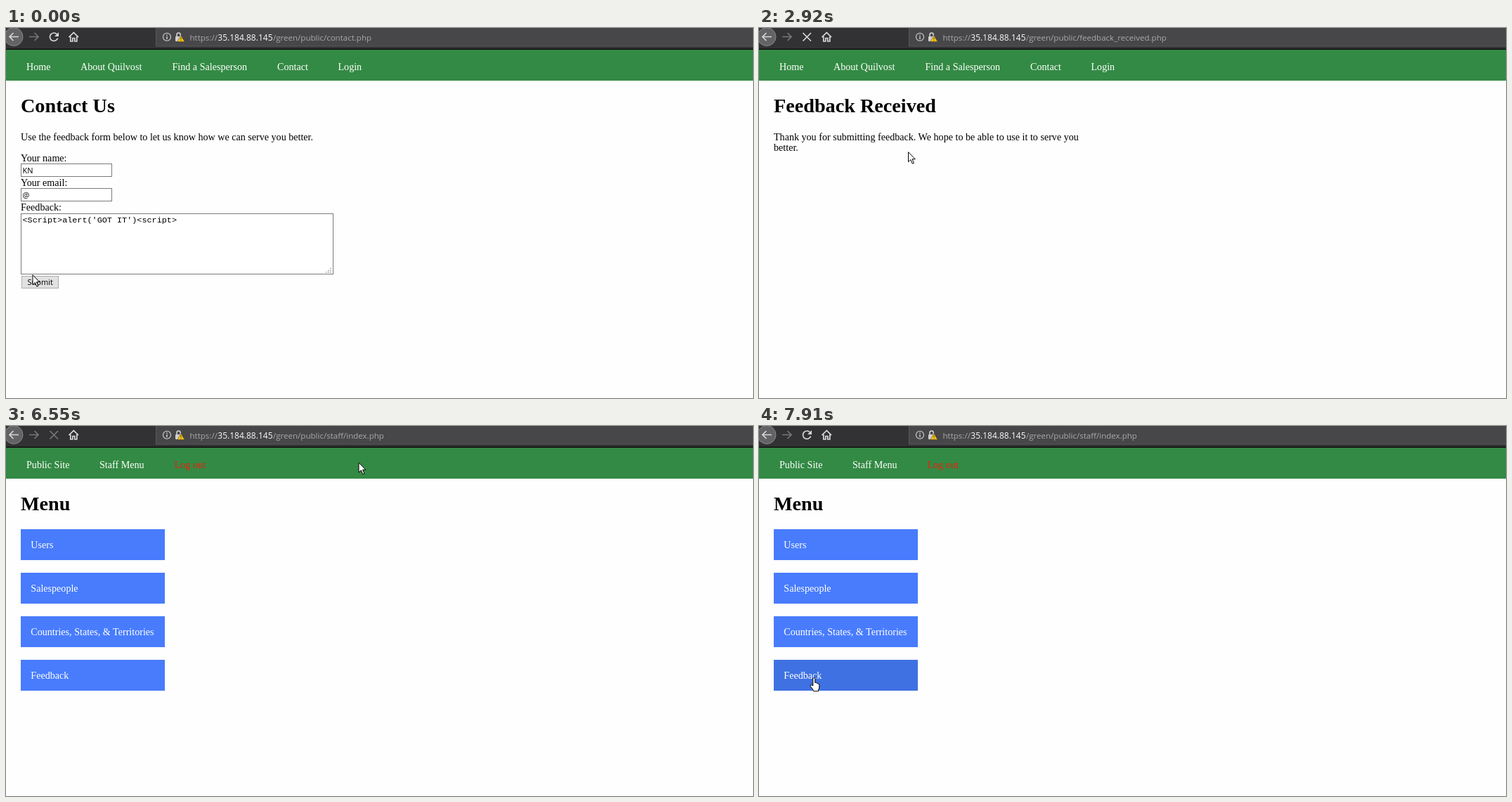
Animation of 1063 by 527 pixels, one loop 8000 ms. Source, as an HTML page:

```html
<!DOCTYPE html>
<html lang="en">
<head>
<meta charset="utf-8">
<title>Feedback form</title>
<style>
  html, body { margin: 0; height: 100%; overflow: hidden; background: #fefefe; }
  svg { display: block; }
  text { font: 14.1px "Liberation Serif", serif; white-space: pre; }
  .h1 { font-size: 28.2px; font-weight: bold; }
  .nav text, .item text { fill: #fff; }
  .nav .out { fill: #f01c10; }
  .item rect { fill: #487cfd; }
  .item.lit rect { fill: #3f71e2; }
  .field { fill: #fff; stroke: #7a7a7a; }
  .ui { font: 11px "Open Sans", sans-serif; }
  .code { font: 11.8px "Liberation Mono", monospace; }
  .url { font: 11.55px "Open Sans", sans-serif; fill: #a9a9ab; }
  .url.host { font-size: 12px; fill: #fbfbfb; }
  #submit rect { fill: #e1e1e1; stroke: #adadad; }
  #submit.lit rect { fill: #e5f1fb; stroke: #0078d7; }
  .icon { fill: none; stroke: #d6d6d8; stroke-width: 1.7; }
  .dim { stroke: #77777a; }
</style>
</head>
<body>
<svg width="1063" height="527" viewBox="0 0 1063 527">
  <rect width="1063" height="527" fill="#fefefe"/>

  <!-- browser toolbar -->
  <rect width="1063" height="31" fill="#323234"/>
  <rect y="29.5" width="1063" height="1.5" fill="#111"/>
  <rect x="213.5" y="-5" width="860" height="31" fill="#474749" stroke="#58585a"/>
  <circle cx="11" cy="12.5" r="13" fill="#636365" stroke="#88888a"/>
  <path class="icon" d="M18 12.5H5M10.5 7L5 12.5L10.5 18"/>
  <path class="icon dim" d="M33 12.5H46M40.5 7L46 12.5L40.5 18"/>
  <g id="reload">
    <path class="icon" d="M72.5 9A5.7 5.7 0 1 0 73.6 14.5"/>
    <path d="M75 6V12H69Z" fill="#d6d6d8"/>
  </g>
  <path id="spin" class="icon dim" d="M64 17A5.7 5.7 0 1 1 72 17"/>
  <path id="stop" class="icon" d="M62.5 7L74 18.5M74 7L62.5 18.5"/>
  <path class="icon" d="M89.5 13.2L96.3 6.5L103 13.2M91.8 12V19H94.8V14.5H97.8V19H100.8V12"/>
  <circle class="icon" cx="229" cy="12.8" r="5.5" style="stroke-width:1.1"/>
  <path class="icon" d="M229 9.3V10.8M229 12V16" style="stroke-width:1.4"/>
  <path class="icon" d="M243 12V9.5A2.6 2.6 0 0 1 248.2 9.5V12" style="stroke-width:1.5"/>
  <rect x="241" y="12" width="9" height="7" rx="1" fill="#cfcfd1"/>
  <path d="M249 10.5L254 19.5H244Z" fill="#ffc40c" stroke="#474749" stroke-width=".6"/>
  <path d="M249 13.3V16.2M249 17.2V18.4" stroke="#5a4500"/>
  <text class="url" x="261.5" y="17.5">https://</text>
  <text class="url host" x="301.3" y="17.5">35.184.88.145</text>
  <text class="url" id="path" x="380" y="17.5"></text>

  <!-- site navigation -->
  <rect y="31" width="1063" height="44" fill="#338a44"/>
  <g class="nav" id="publicNav">
    <text x="29" y="59.5">Home</text>
    <text x="106" y="59.5">About Quilvost</text>
    <text x="236.5" y="59.5">Find a Salesperson</text>
    <text x="386" y="59.5">Contact</text>
    <text x="472.5" y="59.5">Login</text>
  </g>
  <g class="nav" id="staffNav">
    <text x="29" y="59.5">Public Site</text>
    <text x="133" y="59.5">Staff Menu</text>
    <text class="out" x="239.7" y="59.5">Log out</text>
  </g>

  <g class="page">
    <text class="h1" x="21" y="120">Contact Us</text>
    <text x="21" y="159.5">Use the feedback form below to let us know how we can serve you better.</text>
    <text x="21" y="189.5">Your name:</text>
    <rect class="field" x="21.5" y="193.5" width="129" height="18"/>
    <text class="ui" x="23.5" y="207">KN</text>
    <text x="21" y="225">Your email:</text>
    <rect class="field" x="21.5" y="228.5" width="129" height="18"/>
    <text class="ui" x="23.5" y="242">@</text>
    <text x="21" y="260">Feedback:</text>
    <rect class="field" x="21.5" y="264.5" width="444" height="86"/>
    <text class="code" x="23.5" y="276.5">&lt;Script&gt;alert('GOT IT')&lt;script&gt;</text>
    <path d="M461 342.5h2M458 345.5h5M455 348h8" stroke="#999" stroke-width="1.5" stroke-dasharray="1.5 1.5"/>
    <g id="submit">
      <rect x="22.5" y="353.5" width="52" height="17"/>
      <text class="ui" x="30.5" y="366">Submit</text>
    </g>
  </g>

  <g class="page">
    <text class="h1" x="21" y="120">Feedback Received</text>
    <text x="21" y="159.5">Thank you for submitting feedback. We hope to be able to use it to serve you</text>
    <text x="21" y="175">better.</text>
  </g>

  <g class="page">
    <text class="h1" x="21" y="120">Menu</text>
    <g class="item"><rect x="21" y="147" width="205" height="44"/><text x="35.3" y="174">Users</text></g>
    <g class="item"><rect x="21" y="209" width="205" height="44"/><text x="35.3" y="235.5">Salespeople</text></g>
    <g class="item"><rect x="21" y="271" width="205" height="44"/><text x="35.3" y="297.5">Countries, States, &amp; Territories</text></g>
    <g class="item"><rect x="21" y="333" width="205" height="44"/><text x="35.3" y="359.5">Feedback</text></g>
  </g>

  <g id="cursor" fill="#fff" stroke="#000">
    <path id="arrow" d="M.5 .7V14.7L3.8 11.6L6.3 17.2L8.5 16.3L6 10.8H10.3Z"/>
    <path id="hand" d="M4.8 12V2.2a1.5 1.5 0 0 1 3 0V7.6q1.8-.6 2.3.8q1.6-.5 2 .9q1.7-.3 1.7 1.5V14q0 2-1.3 4v1.7H5.8Q5 17 1 12.6Q.9 10.4 3 10.8Z"/>
  </g>
</svg>

<script>
const LOOP = 8000;
const $ = id => document.getElementById(id);
const pages = document.querySelectorAll('.page');
const items = document.querySelectorAll('.item');
const paths = ['contact.php', 'feedback_received.php', 'staff/index.php'];

// Every track is a list of [start time, value...]; values hold until the next entry.
const pageTrack = [[0, 0], [2360, 1], [6550, 2]];
const submitTrack = [[0, false], [300, true], [420, false], [690, true]];
const itemTrack = [[0, -1], [7240, 0], [7480, -1], [7760, 0], [7910, 3]];
const iconTrack = [
  [0, 'reload'], [2100, 'spin'], [2240, 'stop', true], [2640, 'stop'], [3070, 'spin'], [3190, 'reload'],
  [6550, 'stop', true], [6670, 'stop'], [6940, 'spin'], [7240, 'reload']
];
const cursorTrack = [
  [0, 37.5, 351], [300, 41, 362], [420, 43, 371], [690, 43, 367], [820, 42.5, 361],
  [2490, 52, 347], [2640, 96, 292], [2770, 151, 227], [2920, 212, 176], [3070, 266, 132], [3190, 310, 101],
  [3340, 323, 91], [3460, 335, 96], [3580, 345, 101.5], [3730, 357, 101.5], [4000, 345, 101], [4150, 289, 101],
  [5430, 372, 87], [5590, 378, 85], [5740, 452, 91], [5860, 514, 79.5],
  [6010, 516, 66, 'hand'], [6130, 506, 57, 'hand'], [6250, 497, 52, 'hand'],
  [6550, 501.5, 51.5], [6820, 468, 62], [6940, 401, 79], [7090, 243, 127],
  [7240, 198, 158, 'hand'], [7360, 166, 150, 'hand'], [7480, 153, 122], [7600, 151, 91],
  [7760, 106, 218, 'hand'], [7910, 72, 358, 'hand']
];

const at = (track, t) => track.findLast(key => key[0] <= t).slice(1);
const show = (el, on) => el.style.display = on ? '' : 'none';

function draw(t) {
  const [page] = at(pageTrack, t);
  pages.forEach((el, i) => show(el, i === page));
  show($('publicNav'), page < 2);
  show($('staffNav'), page === 2);
  $('path').textContent = '/green/public/' + paths[page];

  const [icon, dim] = at(iconTrack, t);
  for (const id of ['reload', 'spin', 'stop']) show($(id), id === icon);
  $('stop').classList.toggle('dim', !!dim);

  $('submit').classList.toggle('lit', at(submitTrack, t)[0]);
  const [lit] = at(itemTrack, t);
  items.forEach((el, i) => el.classList.toggle('lit', i === lit));

  const [x, y, shape = 'arrow'] = at(cursorTrack, t);
  $('cursor').setAttribute('transform', `translate(${x} ${y})`);
  for (const id of ['arrow', 'hand']) show($(id), id === shape);
}

const start = performance.now();
function tick() {
  draw((performance.now() - start) % LOOP);
  requestAnimationFrame(tick);
}
tick();
</script>
</body>
</html>
```
